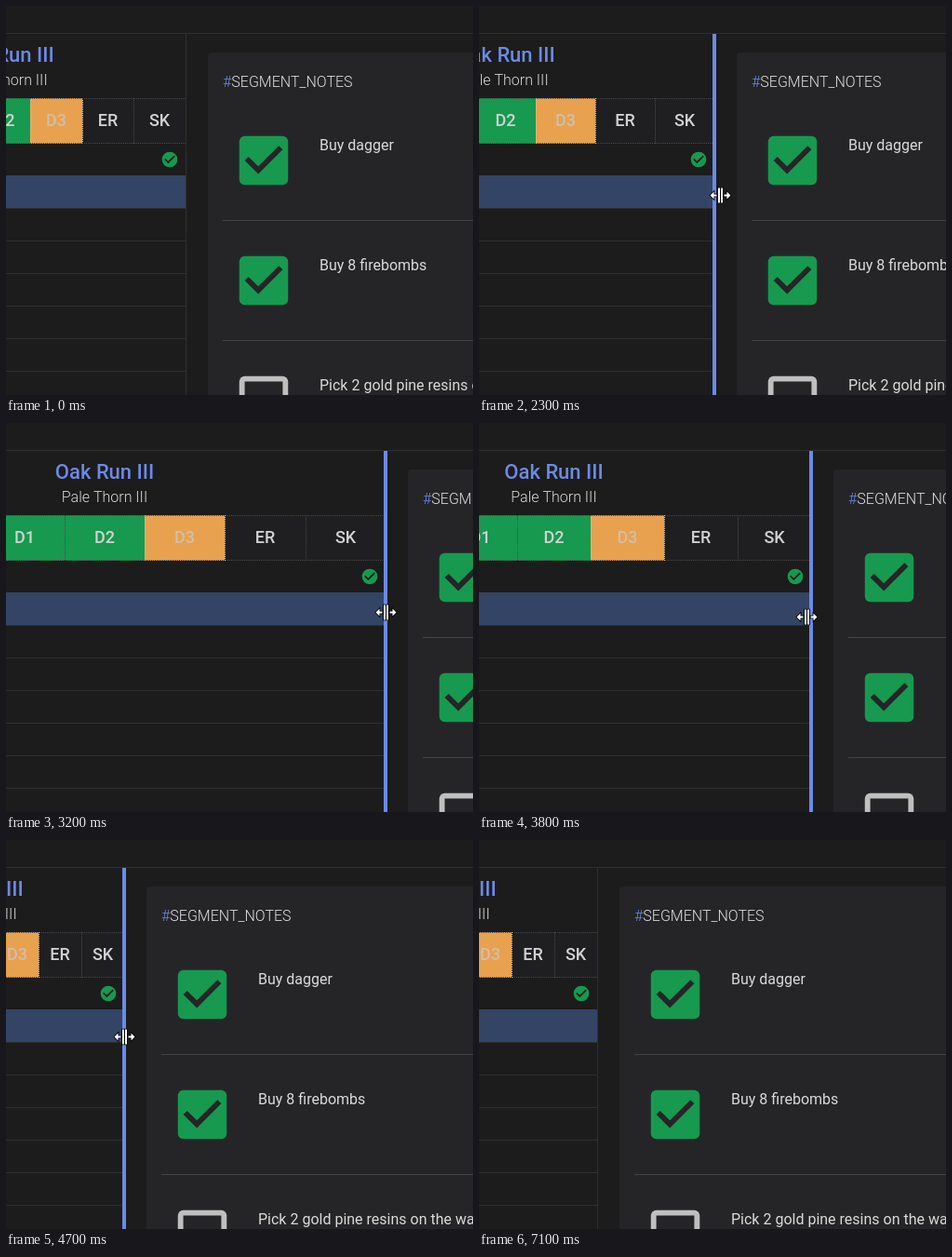
An HTML page with a canvas for the animation above (7.2 s loop, 502x418 px).

```html
<!DOCTYPE html>
<html lang="en">
<head>
<meta charset="utf-8">
<title>Resizable split view</title>
<style>
  html, body { margin: 0; width: 100%; height: 100%; overflow: hidden; background: #1c1c1c; }
  canvas { display: block; }
</style>
</head>
<body>
<canvas id="stage" width="502" height="418"></canvas>
<script>
const W = 502, H = 418, LOOP = 7200, STEP = 100;
const PANEL_LEFT = -196;
const BG = '#1c1c1c', CARD = '#252527', LINE = '#2f2f30', GREEN = '#17994f', BLUE = '#6c8ae6';
const ctx = document.getElementById('stage').getContext('2d');

const TABS = ['DS', 'BB', 'D1', 'D2', 'D3', 'ER', 'SK'];
const NOTES = ['Buy dagger', 'Buy 8 firebombs', 'Pick 2 gold pine resins on the way'];
const CHECK_MARK = new Path2D('M10 17l-5-5 1.41-1.41L10 14.17l7.59-7.59L19 8z');
const BOX = new Path2D('M5 3h14a2 2 0 0 1 2 2v14a2 2 0 0 1-2 2H5a2 2 0 0 1-2-2V5a2 2 0 0 1 2-2z');
const DISC = new Path2D('M2 12a10 10 0 1 0 20 0a10 10 0 1 0-20 0z');
const POINTER = new Path2D('M0 0V16.5L3.8 13L6.4 19L9 17.9L6.5 12H11.8z');
const WIDE_ARROW = new Path2D('M-10.5 0l5-5v3.8h11v-3.8l5 5l-5 5v-3.8h-11v3.8z');
const SPLIT_ARROWS = new Path2D('M-11 0l4-4v3h3v2h-3v3z M11 0l-4-4v3h-3v2h3v3z M-2.5-8h2v16h-2z M.5-8h2v16h-2z');

const clamp = u => Math.min(1, Math.max(0, u));
const progress = (t, from, to) => clamp((t - from) / (to - from));
const easeInOut = (u, p) => u < .5 ? .5 * (2 * u) ** p : 1 - .5 * (2 - 2 * u) ** p;

function splitAt(t) {
  return 193 + 215 * easeInOut(progress(t, 1900, 2900), 2.6)
             - 281 * easeInOut(progress(t, 3100, 4900), 4);
}

// Keys are [time, x, y], joined linearly.
function along(keys, t) {
  const i = Math.max(1, keys.findIndex(k => k[0] >= t));
  const [a, b] = [keys[i - 1], keys[i]];
  const u = progress(t, a[0], b[0]);
  return [a[1] + (b[1] - a[1]) * u, a[2] + (b[2] - a[2]) * u];
}

function rect(x, y, w, h, color) {
  ctx.fillStyle = color;
  ctx.fillRect(x, y, w, h);
}

function text(str, x, y, font, color, align = 'left') {
  ctx.font = font + ' Roboto, sans-serif';
  ctx.textAlign = align;
  ctx.fillStyle = color;
  ctx.fillText(str, x, y);
}

function icon(shape, x, y, size, fill, markColor) {
  ctx.save();
  ctx.translate(x, y);
  ctx.scale(size / 24, size / 24);
  if (fill) {
    ctx.fillStyle = fill;
    ctx.fill(shape);
    ctx.fillStyle = markColor;
    ctx.fill(CHECK_MARK);
  } else {
    ctx.clip(shape);
    ctx.strokeStyle = '#bfbfbf';
    ctx.lineWidth = 4;
    ctx.stroke(shape);
  }
  ctx.restore();
}

function dotted(x1, y1, x2, y2, color) {
  ctx.setLineDash([1, 1]);
  ctx.strokeStyle = color;
  ctx.lineWidth = 1;
  ctx.beginPath();
  ctx.moveTo(x1, y1);
  ctx.lineTo(x2, y2);
  ctx.stroke();
  ctx.setLineDash([]);
}

function drawRun(split) {
  const width = split - PANEL_LEFT, mid = PANEL_LEFT + width / 2;
  ctx.save();
  ctx.beginPath();
  ctx.rect(0, 0, split, H);
  ctx.clip();
  text('Oak Run III', mid, 60, '500 22px', BLUE, 'center');
  text('Pale Thorn III', mid, 85, '300 16px', '#d8d8d8', 'center');

  const tabWidth = width / TABS.length;
  TABS.forEach((name, i) => {
    const x = Math.round(PANEL_LEFT + i * tabWidth);
    const end = Math.round(PANEL_LEFT + (i + 1) * tabWidth);
    const color = i < 4 ? GREEN : i === 4 ? '#e8a14f' : '#1f1f21';
    rect(x, 99, end - x, 49, color);
    dotted(x + .5, 99, x + .5, 148, i === 4 || i === 5 ? '#d9c29c' : '#48484a');
    text(name, (x + end) / 2, 129, '500 18px', i === 4 ? '#cfbfaa' : '#d2d2d2', 'center');
  });
  dotted(0, 99.5, split, 99.5, '#48484a');
  dotted(0, 147.5, split, 147.5, '#48484a');

  icon(DISC, split - 27, 155, 20, GREEN, BG);
  rect(0, 182, split, 35, '#334465');
  for (let y = 217; y < H; y += 35) rect(0, y, split, 1, LINE);
  ctx.restore();
}

function drawNotes(split) {
  ctx.fillStyle = CARD;
  ctx.beginPath();
  ctx.roundRect(split + 24, 50, W, H, 4);
  ctx.fill();
  text('#', split + 40, 87, '300 16px', BLUE);
  const hashWidth = ctx.measureText('#').width;
  text('SEGMENT_NOTES', split + 40 + hashWidth, 87, '300 16px', '#dedede');
  NOTES.forEach((note, i) => {
    const y = 129 * i;
    icon(BOX, split + 49, y + 131, 70, i < 2 && GREEN, CARD);
    text(note, split + 144, y + 155, '400 16px', '#dadada');
    rect(split + 40, y + 230, W, 1, '#434345');
  });
}

function drawCursor(t) {
  let x, y, shape;
  if (t < 1900) {
    [x, y] = along([[0, -65, 327], [300, -20, 300], [800, 128, 225], [1200, 189, 203], [1700, 189, 203], [1900, 193, 203]], t);
    shape = t < 1200 ? POINTER : WIDE_ARROW;
  } else if (t < 5300) {
    x = splitAt(t + 15);
    y = 203 + 8 * progress(t, 3200, 4200);
    shape = SPLIT_ARROWS;
  } else {
    [x, y] = along([[5300, 127, 211], [5700, 35, 214], [5900, -20, 216], [LOOP, -20, 216]], t);
    shape = POINTER;
  }
  ctx.save();
  ctx.translate(Math.round(x) + .5, Math.round(y) + .5);
  ctx.strokeStyle = '#000';
  ctx.lineWidth = 1.6;
  ctx.stroke(shape);
  ctx.fillStyle = '#fff';
  ctx.fill(shape);
  ctx.restore();
}

function draw(t) {
  const split = Math.round(splitAt(t));
  rect(0, 0, W, H, BG);
  drawRun(split);
  drawNotes(split);
  rect(0, 29, W, 1, LINE);
  rect(split, 30, 1, H, LINE);
  ctx.globalAlpha = progress(t, 1500, 1800) - progress(t, 5200, 5500);
  rect(split - 2, 30, 4, H, BLUE);
  ctx.globalAlpha = 1;
  drawCursor(t);
}

function tick() {
  const t = performance.now() % LOOP;
  draw(Math.floor(t / STEP) * STEP);
  requestAnimationFrame(tick);
}
tick();
</script>
</body>
</html>
```
